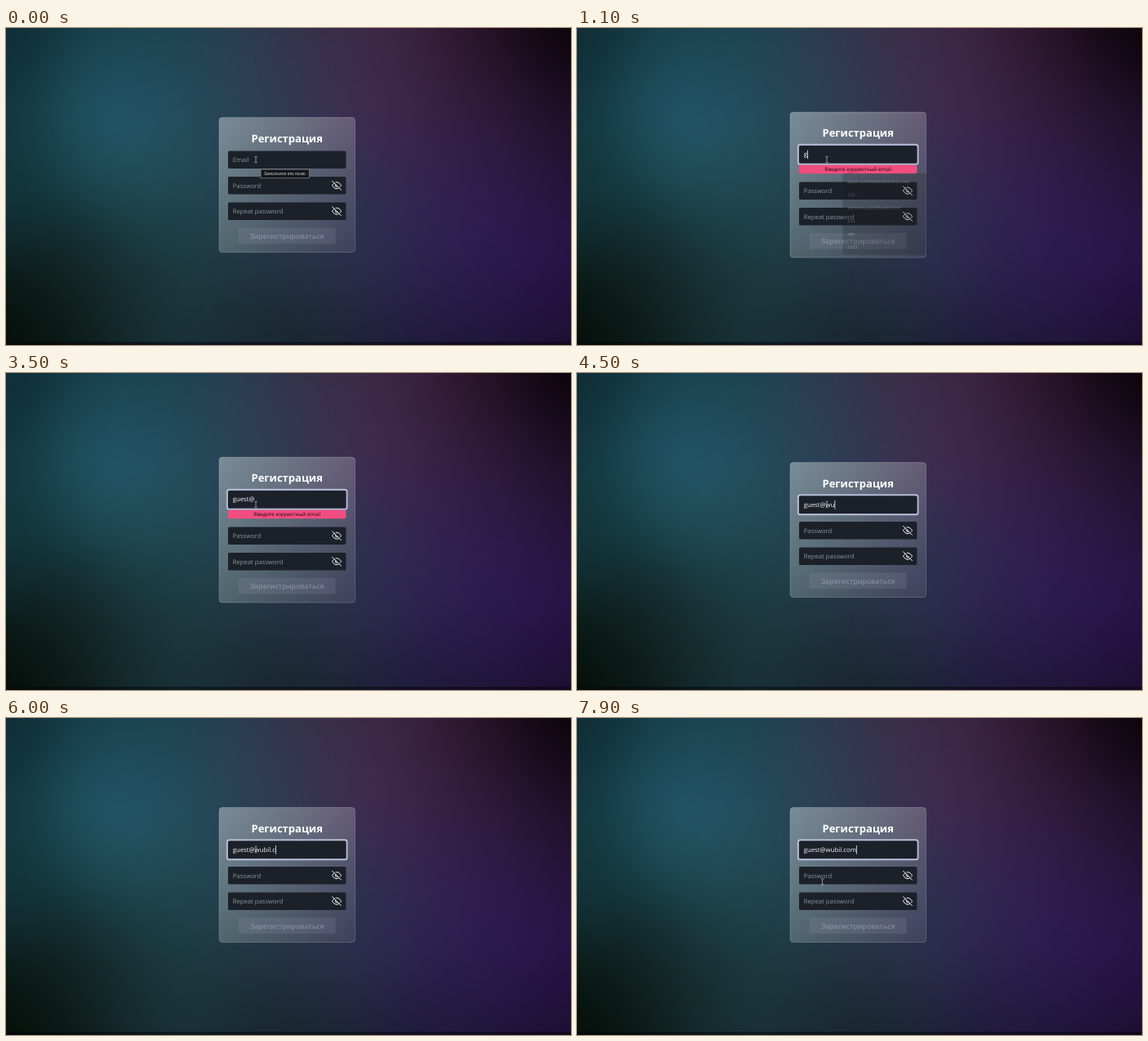
An HTML page with a canvas that plays this animation: 692 px wide and 388 px high, repeating every 8 s.

```html
<!DOCTYPE html>
<html lang="ru">
<head>
<meta charset="utf-8">
<title>Регистрация</title>
<style>
  html, body { margin: 0; width: 100%; height: 100%; overflow: hidden; background: #101820; }
  canvas, svg { position: absolute; left: 0; top: 0; width: 692px; height: 388px; display: block; }
  text { font-family: "Open Sans", "Noto Sans", sans-serif; text-rendering: geometricPrecision; white-space: pre; }
  .mid { text-anchor: middle; }
  .field { fill: #1c2029; }
  .hint { font-size: 7.7px; fill: #8d939f; }
  .item { font-size: 5.5px; font-weight: 600; fill: #f4f4f4; }
</style>
</head>
<body>
<canvas id="bg" width="173" height="97"></canvas>
<svg id="stage" viewBox="0 0 692 388">
  <defs>
    <linearGradient id="glass" x1="0" y1="0" x2="1" y2="1">
      <stop offset="0" stop-color="#fff" stop-opacity=".38"/>
      <stop offset=".5" stop-color="#fff" stop-opacity=".22"/>
      <stop offset="1" stop-color="#fff" stop-opacity=".09"/>
    </linearGradient>
    <g id="eye" transform="scale(.5) translate(-12 -12)" fill="none" stroke="#f3f4f6" stroke-width="2" stroke-linecap="round" stroke-linejoin="round">
      <path d="M17.9 17.9A10 10 0 0 1 12 20C5 20 1 12 1 12a18.4 18.4 0 0 1 5-5.9M9.9 4.2A9 9 0 0 1 12 4c7 0 11 8 11 8a18.5 18.5 0 0 1-2.2 3.2M14.1 14.1a3 3 0 1 1-4.2-4.2M1 1l22 22"/>
    </g>
  </defs>
  <rect y="384" width="692" height="4" fill="#05070c" opacity=".5"/>
  <rect id="card" x="261" width="166.5" rx="4" fill="url(#glass)" stroke="#fff" stroke-opacity=".24" stroke-width=".8"/>

  <g id="upper">
    <text class="mid" x="344.2" y="139.6" font-size="13" font-weight="700" fill="#fff">Регистрация</text>
    <rect id="ring" x="270.8" y="149.3" width="146.8" height="24" rx="2.6" fill="none" stroke="#b4bbd5" stroke-width="1.9"/>
    <rect class="field" x="272" y="150.4" width="144.4" height="21.6" rx="1.5"/>
    <text id="emailHint" class="hint" x="277.7" y="163.9">Email</text>
    <text id="typed" x="277.7" y="163.9" font-size="7.8" fill="#f4f5f7"></text>
    <rect id="caret" y="156" width=".8" height="10.6" fill="#f4f5f7"/>
  </g>

  <g id="error">
    <rect x="272" y="167.8" width="144.4" height="10.4" rx="2.2" fill="#f24d7f"/>
    <text class="mid" x="344.2" y="175.2" font-size="6.3" fill="#1b0d14">Введите корректный email</text>
  </g>

  <g id="lower">
    <rect class="field" x="272" y="181.9" width="144.4" height="21.6" rx="1.5"/>
    <text class="hint" x="277.7" y="195.5">Password</text>
    <use href="#eye" x="405" y="192.7"/>
    <rect class="field" x="272" y="213.4" width="144.4" height="21.6" rx="1.5"/>
    <text class="hint" x="277.7" y="227">Repeat password</text>
    <use href="#eye" x="405" y="224.2"/>
    <rect x="284.6" y="244.5" width="119" height="19.4" rx="1.2" fill="#9a9db8" opacity=".17"/>
    <text class="mid" x="344.2" y="257.7" font-size="8.7" font-weight="600" fill="#c3c8d8" opacity=".42">Зарегистрироваться</text>
  </g>

  <g id="tip">
    <rect x="312" y="173" width="59.5" height="10.8" fill="#17181c" stroke="#8a8c93" stroke-width=".7"/>
    <text class="mid" x="341.7" y="180.3" font-size="5.2" fill="#f0f0f0">Заполните это поле.</text>
  </g>

  <g id="menu"></g>
  <path id="pointer" d="M-1.6-3.6h1.1L0-3.2l.5-.4h1.1M0-3.2v6.4M-1.6 3.6h1.1L0 3.2l.5.4h1.1" fill="none" stroke="#c9ccd2" stroke-width=".7"/>
</svg>
<script>
const $ = id => document.getElementById(id);
const clamp = v => Math.max(0, Math.min(1, v));
const within = (t, spans) => spans.some(([a, b]) => t >= a && t < b);

// Backdrop: colour spots blended by normalised Gaussian weights.
const spots = [
  [0, 0, "#0f2c35"], [145, 105, "#235e70"], [0, 190, "#12343a"], [0, 388, "#030a04"],
  [90, 330, "#10221f"], [200, 320, "#1a363c"], [180, 0, "#183e4a"], [300, 60, "#2d4257"],
  [460, 70, "#472c57"], [400, 0, "#372b43"], [560, 20, "#2c1428"], [692, 0, "#050204"],
  [692, 150, "#1f0f2b"], [580, 150, "#34204a"], [560, 275, "#302058"], [650, 290, "#2b1550"],
  [692, 388, "#180c28"], [540, 388, "#1b1733"], [340, 388, "#18262f"], [340, 220, "#29394c"],
  [210, 210, "#214852"], [450, 260, "#2f2f4e"]
].map(([x, y, c]) => [x, y, parseInt(c.slice(1), 16)]);

function paintBackdrop() {
  const cv = $("bg"), ctx = cv.getContext("2d");
  const img = ctx.createImageData(cv.width, cv.height);
  for (let i = 0; i < cv.width * cv.height; i++) {
    const x = (i % cv.width) * 4 + 2, y = Math.floor(i / cv.width) * 4 + 2;
    let sum = 0, r = 0, g = 0, b = 0;
    for (const [sx, sy, c] of spots) {
      const w = Math.exp(-((x - sx) ** 2 + (y - sy) ** 2) / 9800);
      sum += w;
      r += w * (c >> 16);
      g += w * (c >> 8 & 255);
      b += w * (c & 255);
    }
    img.data.set([r / sum, g / sum, b / sum, 255], i * 4);
  }
  ctx.putImageData(img, 0, 0);
}

const entries = ["pavel.zulmenkov@dulvex.com", "123", "zorinets.pava@wubil.com", "324", "sdv", "1123"];
$("menu").innerHTML =
  '<path d="M329.5 176.5L333 173l3.5 3.5z" fill="#1f1f20"/>' +
  '<rect x="323.6" y="176" width="107" height="103.2" rx="2.2" fill="#1f1f20" stroke="#38393d" stroke-width=".5"/>' +
  entries.map((s, i) => `<text class="item" x="329.3" y="${188 + i * 16.65}">${s}</text>`).join("");

const email = "guest@wubil.com";
const keys = [[1000, 1], [1200, 2], [1300, 3], [1500, 4], [1600, 5], [2300, 6], [4500, 8],
  [4900, 9], [5100, 10], [5200, 11], [5500, 12], [6000, 13], [6500, 15]];
const caretOff = [[0, 600], [1800, 2300], [2500, 3000], [3500, 4500], [7000, 7500]];
const invalid = [[1000, 4500], [5500, 6000]];
const route = [[6400, 306, 161], [6500, 336, 151], [6900, 336, 151], [7000, 346, 146], [7100, 350, 152],
  [7200, 350, 152], [7500, 312, 196], [7700, 286, 212], [7900, 300.5, 200.5]];

function along(path, t) {
  if (t <= path[0][0]) return path[0].slice(1);
  for (let i = 1; i < path.length; i++) {
    const [t0, x0, y0] = path[i - 1], [t1, x1, y1] = path[i];
    if (t <= t1) {
      const k = (t - t0) / (t1 - t0);
      return [x0 + (x1 - x0) * k, y0 + (y1 - y0) * k];
    }
  }
  return path[path.length - 1].slice(1);
}

const show = (id, v) => $(id).setAttribute("opacity", +v);
const move = (id, x, y) => $(id).setAttribute("transform", `translate(${x} ${y})`);

function draw(time) {
  const t = Math.floor(time / 100) * 100;
  const bad = within(t, invalid), grow = bad ? 6.5 : 0;
  $("card").setAttribute("y", 109.5 - grow);
  $("card").setAttribute("height", 165 + 2 * grow);
  move("upper", 0, -grow);
  move("lower", 0, grow);
  show("error", bad);
  show("tip", t < 600);
  show("ring", clamp((t - 500) / 200));

  const count = keys.reduce((n, [at, len]) => t >= at ? len : n, 0);
  $("typed").textContent = email.slice(0, count);
  show("emailHint", !count);
  $("caret").setAttribute("x", 277.7 + (count ? $("typed").getComputedTextLength() : 0));
  show("caret", !within(t, caretOff));

  const open = t < 1000 ? clamp((t - 500) / 300) : clamp(1 - (t - 900) / 260);
  const size = t < 1000 ? 1 : 0.95 + 0.05 * open;
  show("menu", open);
  $("menu").setAttribute("transform", `translate(377 227.5) scale(${size}) translate(-377 -227.5)`);

  move("pointer", ...along(route, t));
}

function tick() {
  draw(performance.now() % 8000);
  requestAnimationFrame(tick);
}
paintBackdrop();
tick();
</script>
</body>
</html>
```
